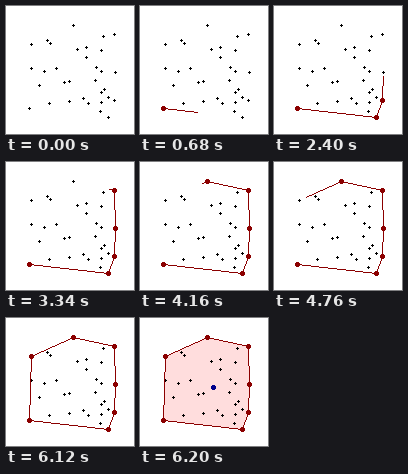
Animation, 128 px wide and 128 px high, one loop 8200 ms. Source, as a matplotlib script:

```python
import numpy as np
import matplotlib.pyplot as plt
from matplotlib.animation import FuncAnimation

SIZE = 128
STEP_MS = 20
FRAMES = 410

WHITE = (255, 255, 255)
BLACK = (0, 0, 0)
RED = (139, 0, 0)
BLUE = (0, 0, 139)
PINK = (255, 221, 221)

INNER = [
    (97, 30), (41, 34), (44, 37), (80, 41), (71, 43), (95, 44), (80, 51),
    (50, 62), (90, 61), (25, 62), (38, 65), (95, 65), (89, 74), (63, 75),
    (58, 76), (33, 79), (98, 83), (95, 86), (102, 91), (77, 92), (63, 95),
    (43, 97), (82, 97), (95, 96), (94, 105),
]
HULL = [(23, 102), (102, 111), (108, 94), (109, 66), (108, 28), (67, 19), (25, 38)]
POINTS = INNER + HULL


def stamp(img, center, radius, reach, color):
    """Fill the pixels whose city-block distance from center is within reach."""
    x, y = center
    for dy in range(-radius, radius + 1):
        for dx in range(-radius, radius + 1):
            if abs(dx) + abs(dy) <= reach:
                img[y + dy, x + dx] = color


def dot(img, center):
    stamp(img, center, 1, 1, BLACK)


def disc(img, center, color):
    stamp(img, center, 2, 3, color)


def trace(a, b):
    """Pixels of the line from a to b, one per step along its longer side."""
    n = max(abs(b[0] - a[0]), abs(b[1] - a[1]))
    t = np.arange(1, n + 1) / n
    xs = np.rint(a[0] + (b[0] - a[0]) * t).astype(int)
    ys = np.rint(a[1] + (b[1] - a[1]) * t).astype(int)
    return list(zip(xs, ys))


def inside_hull():
    ys, xs = np.mgrid[:SIZE, :SIZE]
    mask = np.ones((SIZE, SIZE), bool)
    for (ax, ay), (bx, by) in zip(HULL, HULL[1:] + HULL[:1]):
        mask &= (bx - ax) * (ys - ay) - (by - ay) * (xs - ax) <= 0
    return mask


path, starts = [], []
for a, b in zip(HULL, HULL[1:] + HULL[:1]):
    starts.append(len(path))
    path += trace(a, b)
path_x, path_y = np.array(path).T

inside = inside_hull()
center = tuple(int(round(c)) for c in np.mean(POINTS, axis=0))


def render(step):
    img = np.full((SIZE, SIZE, 3), WHITE, np.uint8)
    done = step > len(path)
    if done:
        img[inside] = PINK
    for p in POINTS:
        dot(img, p)
    img[path_y[:step], path_x[:step]] = RED
    for p, start in zip(HULL, starts):
        if step > start:
            disc(img, p, RED)
    if done:
        disc(img, center, BLUE)
    return img


fig = plt.figure(figsize=(SIZE / 100, SIZE / 100), dpi=100, facecolor="white")
ax = fig.add_axes([0, 0, 1, 1])
ax.axis("off")
view = ax.imshow(render(0), interpolation="nearest", aspect="auto")


def update(step):
    view.set_data(render(step))
    return [view]


anim = FuncAnimation(fig, update, frames=FRAMES, interval=STEP_MS,
                     repeat=True, repeat_delay=0, blit=False)
plt.show()
```
